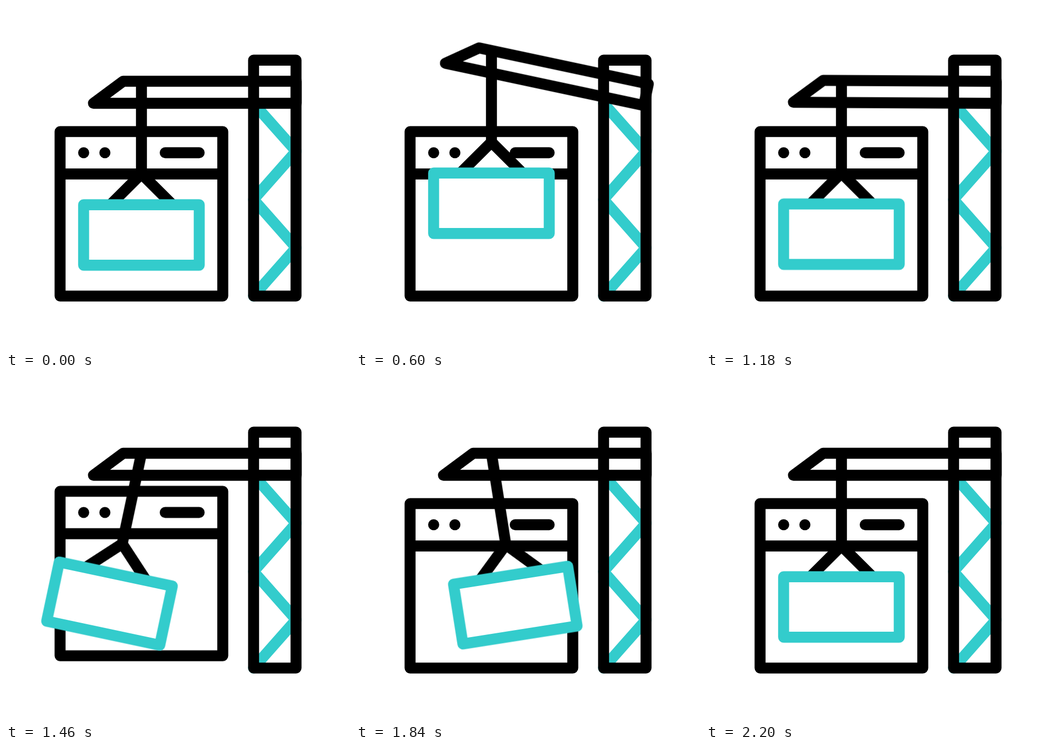
Recreate the animation shown at these times as an HTML page. Size 640 px wide and 640 px high, loop 2400 ms.

```html
<!DOCTYPE html>
<html lang="en">
<head>
<meta charset="utf-8">
<title>Crane building a web page</title>
<style>
  html, body { margin: 0; width: 100%; height: 100%; overflow: hidden; background: #fff; }
  svg { display: block; width: 100%; height: 100%; }
  .line { fill: none; stroke: #000; stroke-width: 20.4; stroke-linecap: round; stroke-linejoin: round; }
  .accent { stroke: #33cccc; }
  .solid { fill: #fff; }
  .butt { stroke-linecap: butt; }
  #boom { transform-origin: 518.5px 161px; }
  #swing { transform-origin: 252px 140px; }
</style>
</head>
<body>
<svg viewBox="0 0 640 640">
  <g id="page" class="line">
    <path d="M100.6 233.6H403.3V539.6H100.6ZM100.6 312.5H403.3M296.2 273H359.4"/>
    <g fill="#000" stroke="none">
      <circle cx="144.5" cy="273" r="10.3"/>
      <circle cx="184" cy="273" r="10.3"/>
    </g>
  </g>

  <path class="line accent" d="M460.5 181L539.8 270.3L460.5 360L539.8 449.8L460.5 539.6"/>
  <path class="line" d="M460.6 100.7H539.6V539.6H460.6Z"/>
  <path id="boom" class="line" d="M162.7 181L218 140H540V181Z"/>

  <g id="lift">
    <g id="swing" class="line">
      <path class="butt" d="M252 140V312.5"/>
      <path d="M194 370L252 312.3L310 370"/>
      <path class="accent solid" d="M144.4 369.7H359.5V482.3H144.4Z"/>
    </g>
  </g>
</svg>
<script>
  const LOOP = 2400;
  const EASE = 'cubic-bezier(0.3333, 0, 0.6667, 1)';
  const turn = deg => `rotate(${deg}deg)`;
  const rise = px => `translateY(${-px}px)`;

  // Each part: transform and its [time in ms, value] keys.
  const parts = {
    boom: [turn, [[200, 0], [600, 12], [1000, 12], [1200, 0]]],
    lift: [rise, [[200, 0], [600, 59], [1000, 59], [1200, 0]]],
    page: [rise, [[1200, 0], [1400, 29.4], [1600, 0]]],
    swing: [turn, [[1200, 0], [1515, 13], [1788, -13], [2000, 13], [2200, 0]]],
  };

  const start = document.timeline.currentTime ?? 0;
  for (const [id, [move, keys]] of Object.entries(parts)) {
    const frames = [[0, 0], ...keys, [LOOP, 0]].map(([time, value]) => ({
      offset: time / LOOP,
      transform: move(value),
      easing: EASE,
    }));
    const animation = document.getElementById(id)
      .animate(frames, { duration: LOOP, iterations: Infinity });
    animation.startTime = start;
  }
</script>
</body>
</html>
```
